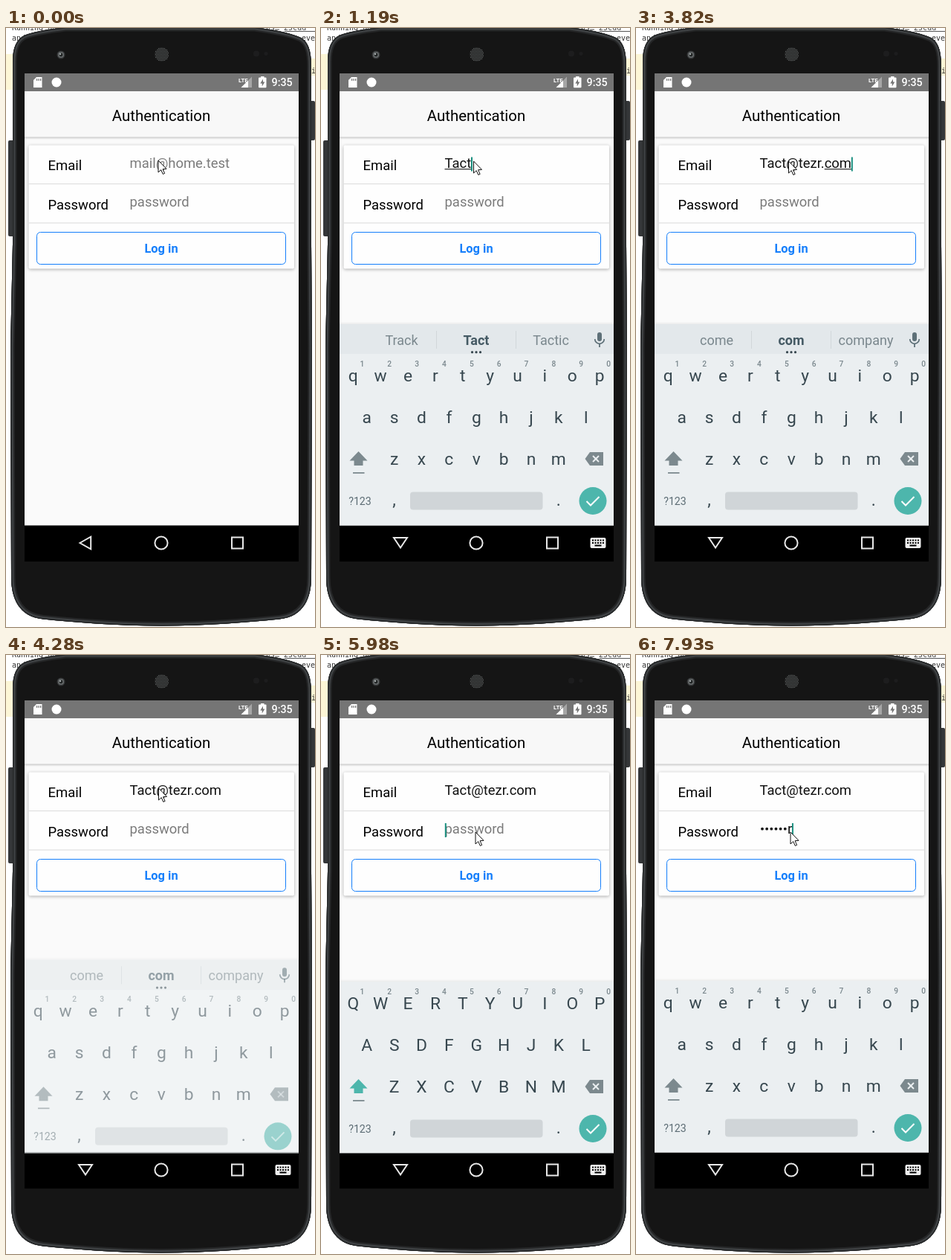
Animation of 416 by 805 pixels, one loop 8 s. Source, as an HTML page with a canvas:

```html
<!DOCTYPE html>
<html lang="en">
<head>
<meta charset="utf-8">
<title>Login form</title>
<style>
html, body { margin: 0; width: 100%; height: 100%; overflow: hidden; background: #fff; }
canvas { display: block; }
</style>
</head>
<body>
<canvas id="stage" width="416" height="805"></canvas>
<script>
const ctx = document.getElementById('stage').getContext('2d');
const LOOP = 8000;
const TEAL = '#4db6ac', BLUE = '#147efb', KEY_TEXT = '#37474f', KEY_GRAY = '#7c898e';
const EMAIL = 'Tact@tezr.com', EMAIL_HINT = 'mail@home.test', SECRET = 'Passwor';
const NAV_TOP = 668.6;

// Times at which each further character appears
const emailTimes = [400, 550, 780, 1010, 1890, 2270, 2500, 2730, 2960, 3270, 3660, 3740, 3820];
const secretTimes = [6760, 6850, 7150, 7310, 7610, 7780, 7930];

const suggestions = [
  [0], [400, 'The', 'T', 'To', 1], [630, 'The', 'Ta', 'Take', 1],
  [930, 'Taco', 'Tac', 'Tacos', 1], [1190, 'Track', 'Tact', 'Tactic', 1], [1950],
  [2420, 'the', 't', 'to'], [2580, 'the', 'te', 'team'], [2810, 'tea', 'tez', 'text'],
  [3040, 'tear', 'tezr', 'test'], [3420], [3740, 'can', 'co', 'could', 1],
  [3820, 'come', 'com', 'company', 1]
];
const pointer = [[0, 205, 178], [150, 205.5, 179], [5150, 205, 179], [5210, 214, 208], [5450, 211, 226], [5530, 208, 238]];

const latest = (list, t) => list.filter(item => item[0] <= t).pop();
const countAt = (times, t) => times.filter(time => time <= t).length;

function rect(x, y, w, h, color, radius = 0) {
  ctx.fillStyle = color;
  ctx.beginPath();
  ctx.roundRect(x, y, w, h, radius);
  ctx.fill();
}

function disc(x, y, r, color) {
  ctx.fillStyle = color;
  ctx.beginPath();
  ctx.arc(x, y, r, 0, Math.PI * 2);
  ctx.fill();
}

function trace(points, close = true) {
  ctx.beginPath();
  points.forEach(([x, y]) => ctx.lineTo(x, y));
  if (close) ctx.closePath();
}

function poly(points, color) {
  trace(points);
  ctx.fillStyle = color;
  ctx.fill();
}

function line(points, color, width, close = false) {
  trace(points, close);
  ctx.strokeStyle = color;
  ctx.lineWidth = width;
  ctx.stroke();
}

function text(str, x, y, size, color, align = 'left', weight = 400, family = 'Roboto, sans-serif') {
  ctx.font = `${weight} ${size}px ${family}`;
  ctx.fillStyle = color;
  ctx.textAlign = align;
  ctx.fillText(str, x, y);
  return ctx.measureText(str).width;
}

function drawBackdrop() {
  rect(0, 0, 416, 805, '#fff');
  rect(0, 35, 10, 48, '#fdf6d6');
  rect(405, 41, 11, 23, '#fdf6d6');
  const mono = '"DejaVu Sans Mono", monospace';
  text('Running app', 8, 3, 10, '#333', 'left', 400, mono);
  text('and', 8, 17, 10, '#333', 'left', 400, mono);
  text('ps… 25cdd', 350, 3, 10, '#444', 'left', 400, mono);
  text('eve', 398, 17, 10, '#333', 'left', 400, mono);
  text('i', 411, 61, 10, '#333', 'left', 400, mono);
  rect(375, 4, 41, 1, '#555');
}

function drawPhone() {
  rect(3, 151, 8, 129, '#343638', 2);
  rect(408, 98, 8, 53, '#343638', 2);
  const body = new Path2D(`M80 -1 C55 2 38 5 27 9 C14 14 9 26 9 46 L9 290 L6 430 L7 738
    C7 766 17 791 50 794.5 C95 799 150 803.5 209 803.5 C268 803.5 323 799 368 794.5
    C401 791 411 766 411 738 L412 430 L411 290 L411 52
    C411 30 407 19 397 13 C384 7 365 3 335 -1 Z`);
  ctx.fillStyle = '#151515';
  ctx.fill(body);
  ctx.save();
  ctx.clip(body);
  [[11, '#252627'], [7, '#3f4244'], [3, '#262829']].forEach(([width, color]) => {
    ctx.lineWidth = width;
    ctx.strokeStyle = color;
    ctx.stroke(body);
  });
  ctx.restore();

  disc(74, 36, 5.5, '#353738');
  disc(74, 36, 4, '#666a6b');
  disc(74, 36, 2.4, '#202323');
  disc(73, 35, 1.2, '#a4aaac');
  disc(209.5, 35.5, 9.5, '#262727');
  for (let y = -8; y <= 8; y += 2)
    for (let x = -8; x <= 8; x += 2)
      if (x * x + y * y < 84) rect(209 + x + (y / 2 % 2 ? 1 : 0), 35 + y, 1, 1, '#5d6060');
  disc(337, 34.5, 4, '#1d1d1e');
  disc(350, 34.5, 2.5, '#1d1d1e');
}

function drawStatusBar() {
  rect(25, 61, 369, 24, '#757575');
  poly([[41, 66], [48.5, 66], [48.5, 80], [37, 80], [37, 70]], '#fff');
  [41, 43.5, 46].forEach(x => rect(x, 68, 1.2, 3, '#757575'));
  disc(68, 73, 6.5, '#fff');
  poly([[331, 65.5], [331, 80], [316.5, 80]], '#a6a6a6');
  poly([[326, 70.5], [326, 80], [316.5, 80]], '#fff');
  text('LTE', 313, 72.5, 7.8, '#fff', 'left', 700);
  rect(343, 65, 4.5, 3, '#fff');
  rect(340, 66.5, 10.5, 13.7, '#fff', 1);
  poly([[346, 68.5], [342.3, 74.5], [344.7, 74.5], [344.7, 78.5], [348.4, 72.6], [346, 72.6]], '#757575');
  text('9:35', 357.5, 78, 14.3, '#fff', 'left', 500);
}

function drawForm() {
  rect(25, 85, 369, 584, '#fafafa');
  rect(25, 85, 369, 62, '#f8f8f8');
  [.2, .1, .04].forEach((a, i) => rect(25, 146.5 + i, 369, 1, `rgba(0,0,0,${a})`));
  text('Authentication', 209, 124.5, 20.4, '#000', 'center');

  ctx.save();
  ctx.shadowColor = 'rgba(0,0,0,.32)';
  ctx.shadowBlur = 4;
  ctx.shadowOffsetY = 1;
  rect(30.5, 157.5, 357.5, 166, '#fefefe', 2);
  ctx.restore();
  rect(30.5, 209, 357.5, 1, '#dcdcdc');
  rect(30.5, 261.5, 357.5, 1, '#dcdcdc');
  text('Email', 56.5, 191, 18.45, '#000');
  text('Password', 56.5, 243.5, 18.45, '#000');

  ctx.beginPath();
  ctx.roundRect(41.5, 274.5, 335, 43, 5);
  ctx.strokeStyle = BLUE;
  ctx.lineWidth = 1;
  ctx.stroke();
  text('Log in', 209, 302, 16.4, BLUE, 'center', 700);
}

function drawCaret(x, y) {
  rect(x - .2, y, 2, 19, '#1b9080');
}

function drawEmail(t) {
  const typed = EMAIL.slice(0, countAt(emailTimes, t));
  if (!typed) {
    text(EMAIL_HINT, 166.5, 188, 18.45, '#7b7b7b');
    return;
  }
  const width = text(typed, 166.5, 188, 18.45, '#111');
  if (t >= 4120) return;
  const word = typed.match(/\w*$/)[0];
  const wordWidth = ctx.measureText(word).width;
  if (word) rect(166.5 + width - wordWidth, 189, wordWidth, 1.3, '#333');
  if (t < 1720 || t >= 1890) drawCaret(166.5 + width, 173.5);
}

function drawSecret(t) {
  const count = countAt(secretTimes, t);
  let x = 167;
  if (!count) text('password', 166.5, 240, 18.45, '#7b7b7b');
  for (let i = 0; i < count - 1; i++, x += 6.15) disc(x + 3, 233.7, 1.9, '#111');
  if (count) x += text(SECRET[count - 1], x, 240, 18.45, '#111');
  if ((t >= 5600 && t < 6300) || t >= 6760) drawCaret(x, 226);
}

function drawSuggestions(t) {
  rect(25, 398, 369, 41, '#e3e8eb');
  rect(155, 407, 1, 24, '#d1d7da');
  rect(262, 407, 1, 24, '#d1d7da');
  const [, left, middle, right, bold] = latest(suggestions, t);
  if (left) {
    text(left, 108.5, 426, 18, '#7a878d', 'center');
    text(middle, 209, 426, 18, '#455a64', 'center', bold ? 700 : 500);
    text(right, 309.5, 426, 18, '#7a878d', 'center');
    [203.5, 209, 214.5].forEach(x => disc(x, 435.7, 1.6, KEY_TEXT));
  }
  rect(372, 409, 6, 12, '#5e7078', 3);
  ctx.beginPath();
  ctx.arc(375, 418, 6.3, 0, Math.PI);
  ctx.strokeStyle = '#5e7078';
  ctx.lineWidth = 1.7;
  ctx.stroke();
  rect(374.1, 424, 1.8, 5, '#5e7078');
}

function drawKeys(upper) {
  rect(25, 438, 369, NAV_TOP - 438, '#ebeff1');
  const rows = [['qwertyuiop', 43.3, 474.5], ['asdfghjkl', 61.8, 530.5], ['zxcvbnm', 98.6, 586.5]];
  rows.forEach(([letters, start, y], row) => [...letters].forEach((letter, i) => {
    const x = start + i * 36.87;
    text(upper ? letter.toUpperCase() : letter, x, y + (upper ? .5 : 0), 22.8, KEY_TEXT, 'center');
    if (!row) text((i + 1) % 10, x + 12, 454.5, 10.2, '#7a878d', 'center', 500);
  }));

  const shift = upper ? TEAL : KEY_GRAY;
  poly([[50.5, 569], [62.5, 581.5], [56.5, 581.5], [56.5, 588], [44.5, 588], [44.5, 581.5], [38.5, 581.5]], shift);
  rect(43, 597, 15.5, 1.8, KEY_GRAY);
  poly([[362, 570], [380, 570], [380, 588], [362, 588], [355.5, 579]], KEY_GRAY);
  line([[366, 575], [374, 583]], '#ebeff1', 2);
  line([[374, 575], [366, 583]], '#ebeff1', 2);

  text('?123', 52.5, 640.5, 14.2, '#5c6c74', 'center');
  text(',', 98.5, 642, 23, KEY_TEXT, 'center');
  rect(120, 623.5, 178.5, 24, '#d0d5d8', 4);
  text('.', 319.7, 642, 23, KEY_TEXT, 'center');
  disc(366, 635.5, 18.5, TEAL);
  line([[357.5, 636], [363, 641.5], [374.5, 630]], '#fff', 2);
}

// Offset and opacity of the keyboard, or null while it is hidden
function keyboardPose(t) {
  if (t < 150 || (t >= 4370 && t < 5680)) return null;
  if (t < 4200) return { shift: 0, alpha: 1 };
  if (t < 4370) {
    const p = (t - 4200) / 170;
    return { shift: 50 * p * p, alpha: 1 - p };
  }
  const p = Math.min(1, (t - 5680) / 390);
  return { shift: Math.round(60 * (1 - p) ** 3), alpha: Math.min(1, p * 2) };
}

function drawKeyboard(t) {
  const pose = keyboardPose(t);
  if (!pose) return;
  const forEmail = t < 5000;
  const top = forEmail ? 398 : 438;
  ctx.save();
  ctx.beginPath();
  ctx.rect(25, 85, 369, 585);
  ctx.clip();
  ctx.globalAlpha = pose.alpha;
  ctx.translate(0, pose.shift);
  [.015, .03, .05].forEach((a, i) => rect(25, top - 3 + i, 369, 1, `rgba(0,0,0,${a})`));
  if (forEmail) drawSuggestions(t);
  drawKeys(t < 400 || (t >= 5680 && t < 6760));
  ctx.restore();
}

function drawNavBar(keyboardOpen) {
  rect(25, NAV_TOP, 369, 717 - NAV_TOP, '#000');
  const back = keyboardOpen ? [[98, 685], [116, 685], [107, 698.5]] : [[99.5, 692], [114.2, 683.7], [114.2, 700.3]];
  line(back, '#e8e8e8', 2, true);
  ctx.beginPath();
  ctx.arc(209, 692, 8.6, 0, Math.PI * 2);
  ctx.stroke();
  ctx.strokeRect(304, 684.5, 15, 15);
  if (!keyboardOpen) return;
  rect(362.5, 685, 21, 14, '#eee', 2);
  for (let row = 0; row < 2; row++)
    for (let i = 0; i < 5; i++) rect(365 + i * 3.5, 687.5 + row * 3.5, 2, 2, '#000');
  rect(368.5, 694.5, 9, 2, '#000');
}

function drawPointer(t) {
  const [, x, y] = latest(pointer, t);
  ctx.save();
  ctx.translate(x, y);
  const arrow = [[0, 0], [0, 16], [3.7, 12.6], [6.3, 18.4], [8.6, 17.4], [6.1, 11.7], [11, 11.3]];
  poly(arrow, '#fff');
  line(arrow, '#111', 1, true);
  ctx.restore();
}

function render(t) {
  drawBackdrop();
  drawPhone();
  drawStatusBar();
  drawForm();
  drawEmail(t);
  drawSecret(t);
  drawNavBar((t >= 150 && t < 4290) || t >= 5750);
  drawKeyboard(t);
  drawPointer(t);
}

const start = performance.now();
function tick() {
  render((performance.now() - start) % LOOP);
  requestAnimationFrame(tick);
}
tick();
</script>
</body>
</html>
```
